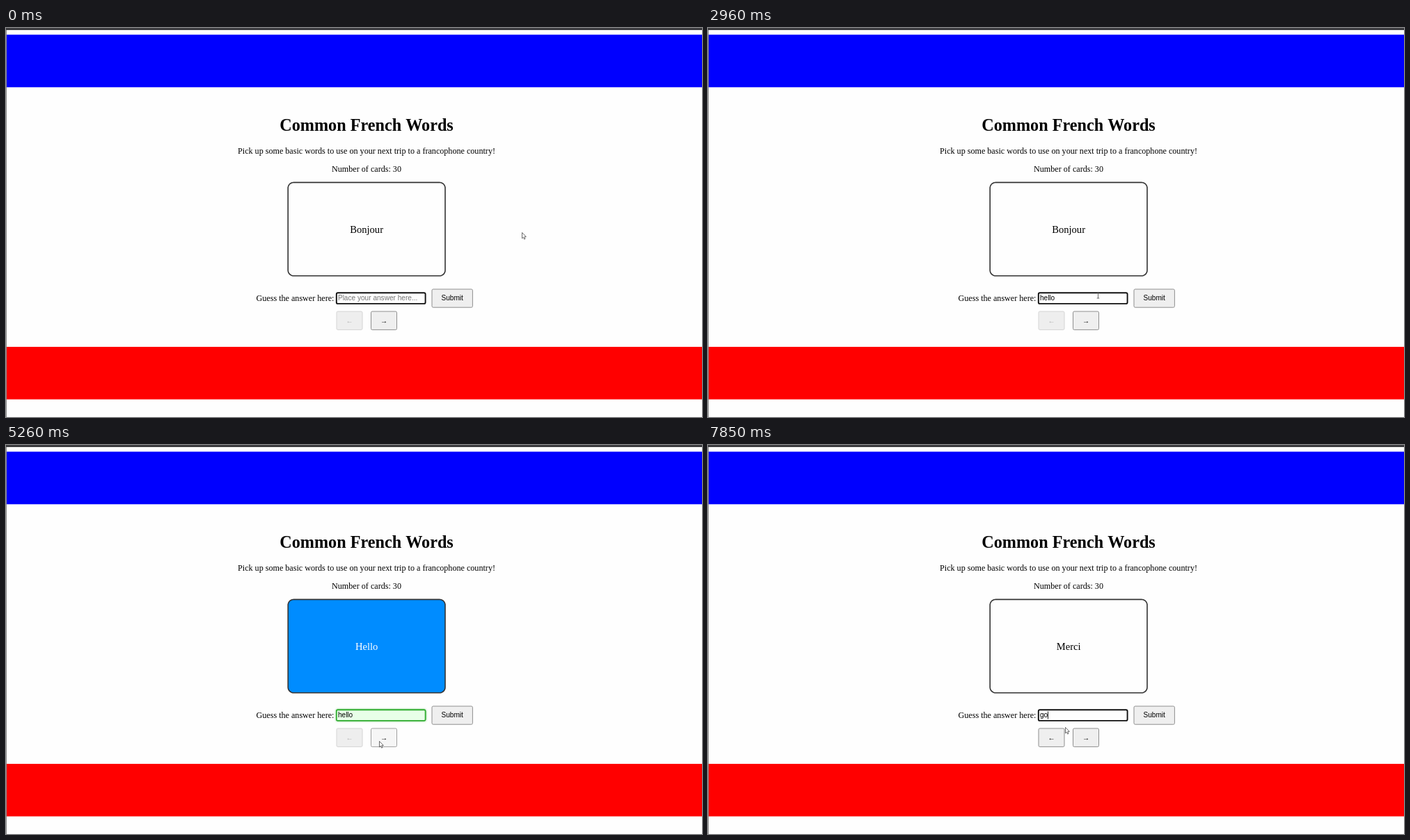
An HTML page with a canvas for the animation above (8 s loop, 1000 by 560 pixels).

```html
<!DOCTYPE html>
<html lang="en">
<head>
<meta charset="utf-8">
<title>Common French Words</title>
<style>
  html, body { margin: 0; width: 100%; height: 100%; overflow: hidden; background: #fefefe; }
  canvas { display: block; width: 1000px; height: 560px; }
</style>
</head>
<body>
<canvas id="stage"></canvas>
<script>
const W = 1000, H = 560, LOOP = 8000;
const SERIF = '"Liberation Serif", "Times New Roman", serif';
const SANS = '"Liberation Sans", Arial, sans-serif';
const PAPER = '#fefefe', INK = '#000';
const CARD = { x: 518.1, y: 289.6, w: 227.4, h: 136, r: 9, border: 1.6, depth: 757 };
const HINT = 'Place your answer here...';

const canvas = document.getElementById('stage');
const ctx = canvas.getContext('2d');
const ratio = window.devicePixelRatio || 1;
canvas.width = W * ratio;
canvas.height = H * ratio;

// Each track is a list of [start time, value...]; a value holds until the next entry.
const pointer = [
  [0, 741.5, 294.5, 'arrow'], [280, 698.5, 330, 'arrow'], [420, 640.5, 348, 'arrow'],
  [550, 572.5, 369, 'arrow'], [700, 560.5, 385, 'beam'], [4720, 548.5, 405, 'arrow'],
  [4850, 536.5, 426.5, 'arrow'], [5780, 515.5, 399.5, 'arrow'], [5910, 499.5, 382, 'beam'],
  [6070, 511.5, 405.5, 'arrow'], [6220, 513.5, 406.5, 'arrow']
];
const typed = [
  [0, ''], [1850, 'h'], [2000, 'he'], [2150, 'hel'], [2280, 'hell'], [2430, 'hello'],
  [5390, ''], [7850, 'go']
];
const caret = [
  [0, false], [130, true], [700, false], [860, true], [1440, false], [1850, true],
  [2960, false], [3500, true], [4030, false], [4590, true], [5130, false],
  [5910, true], [6370, false], [6900, true], [7460, false], [7850, true]
];
const inputState = [[0, 'focus'], [3370, 'right'], [5390, 'idle'], [5910, 'focus']];
// word, back side?, tilt in degrees
const card = [
  [0, 'Bonjour', false, 0], [3370, 'Hello', true, 23], [3500, 'Hello', true, 0],
  [5390, 'Merci', false, -80], [5520, 'Merci', false, -4], [5650, 'Merci', false, 0]
];

function at(track, t) {
  let hit = track[0];
  for (const key of track) if (key[0] <= t) hit = key;
  return hit.slice(1);
}

function rect(x, y, w, h, color) {
  ctx.fillStyle = color;
  ctx.fillRect(x, y, w, h);
}

function text(str, x, y, font, color = INK, align = 'center') {
  ctx.font = font;
  ctx.fillStyle = color;
  ctx.textAlign = align;
  ctx.fillText(str, x, y);
}

function box(x, y, w, h, r, fill, stroke, line) {
  ctx.beginPath();
  ctx.roundRect(x, y, w, h, r);
  ctx.fillStyle = fill;
  ctx.fill();
  ctx.strokeStyle = stroke;
  ctx.lineWidth = line;
  ctx.stroke();
}

function drawPage() {
  rect(0, 0, W, H, PAPER);
  rect(0, 0, W, 3, '#3c3c40');
  rect(0, 9.6, W, 75.7, '#00f');
  rect(0, 459, W, 75.6, '#f00');
  rect(0, 3, 1, H - 3, '#8c8c8c');
  text('Common French Words', 518, 148, `bold 24.2px ${SERIF}`);
  const body = `12.12px ${SERIF}`;
  text('Pick up some basic words to use on your next trip to a francophone country!', 518, 181, body);
  text('Number of cards: 30', 518, 206.5, body);
  text('Guess the answer here:', 359.5, 393, body, INK, 'left');
}

// Rounded rectangle turned about its vertical axis and seen in perspective.
function tiltedPath(w, h, r, angle) {
  const sin = Math.sin(angle), cos = Math.cos(angle);
  ctx.beginPath();
  for (let corner = 0; corner < 4; corner++) {
    const sx = corner === 0 || corner === 3 ? 1 : -1;
    const sy = corner < 2 ? 1 : -1;
    for (let i = 0; i <= 10; i++) {
      const a = (corner + i / 10) * Math.PI / 2;
      const x = sx * (w / 2 - r) + r * Math.cos(a);
      const y = sy * (h / 2 - r) + r * Math.sin(a);
      const k = CARD.depth / (CARD.depth - x * sin);
      ctx.lineTo(CARD.x + x * cos * k, CARD.y + y * k);
    }
  }
  ctx.closePath();
}

function drawCard([word, back, degrees]) {
  const angle = degrees * Math.PI / 180;
  const b = CARD.border;
  tiltedPath(CARD.w, CARD.h, CARD.r, angle);
  ctx.fillStyle = '#333';
  ctx.fill();
  tiltedPath(CARD.w - 2 * b, CARD.h - 2 * b, CARD.r - b, angle);
  ctx.fillStyle = back ? '#008cff' : PAPER;
  ctx.fill();
  ctx.save();
  ctx.translate(CARD.x, 295);
  ctx.scale(Math.cos(angle), 1);
  text(word, 0, 0, `14.6px ${SERIF}`, back ? '#fff' : INK);
  ctx.restore();
}

function drawInput(state, value, showCaret) {
  const font = `10.1px ${SANS}`;
  if (state === 'right') {
    ctx.save();
    ctx.shadowColor = 'rgba(40, 180, 40, 0.6)';
    ctx.shadowBlur = 3 * ratio;
    box(474.9, 381.4, 127.6, 15.4, 1.5, '#e8ffe8', '#32ad32', 1.6);
    ctx.restore();
    box(474.9, 381.4, 127.6, 15.4, 1.5, '#e8ffe8', '#32ad32', 1.6);
  } else if (state === 'focus') {
    box(474.8, 381.3, 127.8, 15.6, 2, PAPER, '#101010', 1.9);
  } else {
    box(475.5, 381.5, 126.5, 15, 1.5, PAPER, '#767676', 1);
  }
  text(value || HINT, 476.9, 392.4, font, value ? INK : '#757575', 'left');
  if (showCaret) {
    const x = Math.floor(476.9 + (value ? ctx.measureText(value).width : 0.2)) + (value ? 0 : 1);
    rect(x, 383.5, 1, 11, '#222');
  }
}

function drawButton(x, y, w, h, label, baseline, look = 'normal') {
  const [fill, stroke, color] = {
    normal: ['#efefef', '#8e8e8e', INK],
    hover: ['#f6f6f6', '#a0a0a0', INK],
    disabled: ['#eeeeee', '#d4d4d4', '#b0b0b0']
  }[look];
  box(x, y, w, h, 1.8, fill, stroke, 1);
  text(label, x + w / 2, baseline, `10.1px ${SANS}`, color);
}

function drawPointer([x, y, kind]) {
  ctx.save();
  ctx.translate(x, y);
  ctx.beginPath();
  if (kind === 'beam') {
    ctx.moveTo(-1.8, -4); ctx.lineTo(1.8, -4);
    ctx.moveTo(0, -4); ctx.lineTo(0, 4);
    ctx.moveTo(-1.8, 4); ctx.lineTo(1.8, 4);
  } else {
    ctx.moveTo(0, 0);
    [[0, 8.4], [1.9, 6.7], [3.1, 9.6], [4.5, 9], [3.3, 6.2], [5.8, 6]]
      .forEach(([px, py]) => ctx.lineTo(px, py));
    ctx.closePath();
    ctx.fillStyle = '#fff';
    ctx.fill();
  }
  ctx.strokeStyle = '#4a4a4a';
  ctx.lineWidth = 0.8;
  ctx.stroke();
  ctx.restore();
}

function draw(t) {
  ctx.setTransform(ratio, 0, 0, ratio, 0, 0);
  drawPage();
  drawCard(at(card, t));
  drawInput(at(inputState, t)[0], at(typed, t)[0], at(caret, t)[0]);
  drawButton(612, 376, 58.4, 26.2, 'Submit', 392.4);
  drawButton(475, 408, 37, 26.4, '←', 425.2, t < 5390 ? 'disabled' : 'normal');
  drawButton(524.5, 408, 37, 26.4, '→', 425.2, t >= 4850 && t < 5780 ? 'hover' : 'normal');
  drawPointer(at(pointer, t));
}

const start = performance.now();
function tick() {
  draw((performance.now() - start) % LOOP);
  requestAnimationFrame(tick);
}
tick();
</script>
</body>
</html>
```
